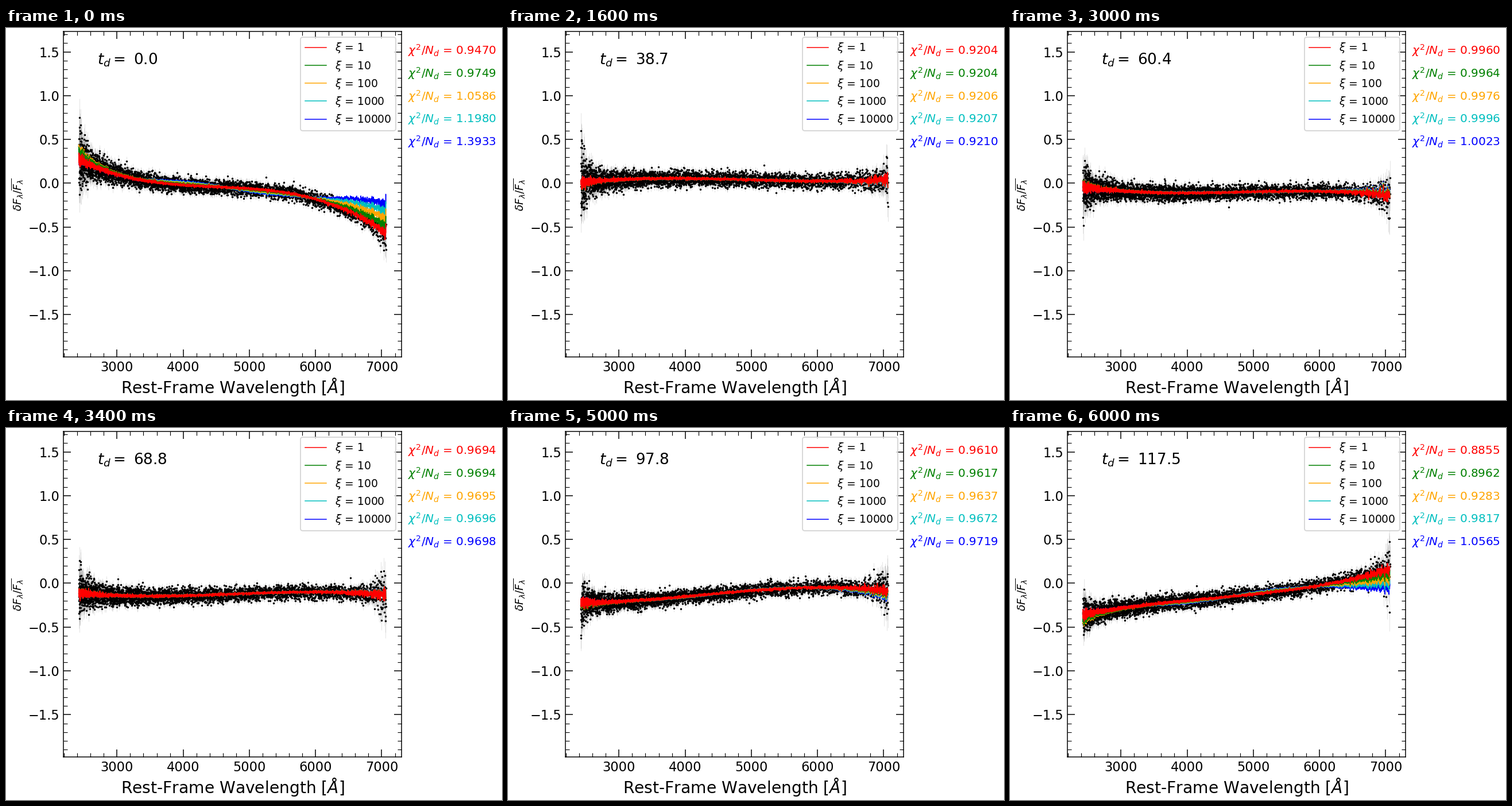
Animation, 864 px wide and 648 px high, one loop 6.2 s. Source, as a matplotlib script:

```python
import numpy as np
import matplotlib.pyplot as plt
from matplotlib.animation import FuncAnimation
from matplotlib.collections import LineCollection
from matplotlib.ticker import AutoMinorLocator, MultipleLocator

W, H, DPI = 864, 648, 135
FRAMES, STEP = 31, 200
LO, HI, N = 2424, 7063, 4000
COLORS = ["r", "g", "orange", "c", "b"]

# Key points over time; everything else follows from these.
KEYS = [0, 4, 8, 15, 20, 25, 30]
DAYS = [0, 17.7, 38.7, 60.4, 81.5, 97.8, 117.5]
LEVEL = [-0.05, -0.014, 0.045, -0.102, -0.155, -0.10, -0.145]
BOW = [-0.10, 0.04, -0.02, 0.012, -0.02, -0.055, 0.045]
TWIST = [-0.33, -0.05, 0.06, -0.09, -0.06, -0.085, 0.09]
CHI2 = [0.9470, 0.9730, 0.9204, 0.9960, 0.9295, 0.9610, 0.8855]

wave = np.geomspace(LO, HI, N)
u = (wave - LO) / (HI - LO)
v = 2 * u - 1
blue_ramp = np.exp(-u / 0.06)
red_ramp = np.clip((u - 0.75) / 0.25, 0, 1) ** 1.3
wiggle = 0.11 * np.where((u > 0.2) & (u < 0.75),
                         np.sin(2 * np.pi * (u - 0.2) / 0.55), 0)


def ends(mid, blue, blue_len, red, red_len):
    """A flat floor that grows exponentially towards both ends."""
    return (mid + blue * np.exp((LO - wave) / blue_len)
            + red * np.exp((wave - HI) / red_len))


model_sigma = ends(0.0075, 0.025, 250, 0.03, 350)


def key(k, track):
    return np.interp(k, KEYS, track)


def slope(k):
    t = k / (FRAMES - 1)
    return -0.09 + 0.26 * t * t * (3 - 2 * t)


def tilt(k):
    return slope(k) + key(k, TWIST)


def flux_sigma(k):
    t = k / (FRAMES - 1)
    blue, red = 1.2 - 0.6 * t, 0.65 + 0.5 * t
    return ends(0.041, 0.11 * blue, 70, 0.12 * red, 60) + ends(
        0, 0.045 * blue, 450, 0.05 * red, 250)


def model(k, i):
    """Mean spectrum of model i; stiffer models follow the tilt less."""
    base = np.polyval([key(k, TWIST), key(k, BOW), slope(k), key(k, LEVEL)], v)
    stiff = i / 4
    lag = 0.8 * stiff * (red_ramp + wiggle)
    lift = 0.22 * np.sin(np.pi * stiff) * blue_ramp
    return base - tilt(k) * (lag + lift)


def chi2(k, i):
    return key(k, CHI2) + 2.53 * tilt(k) ** 2 * (i / 4) ** 2


fig = plt.figure(figsize=(W / DPI, H / DPI), dpi=DPI, facecolor="white")
fig.set_size_inches(6.4, 4.8)
ax = fig.add_axes([100.1 / W, 1 - 573 / H, 588.4 / W, 566.6 / H])
ax.set_xlim(2191, 7295)
ax.set_ylim(-1.982, 1.730)
ax.xaxis.set_major_locator(MultipleLocator(1000))
ax.yaxis.set_major_locator(MultipleLocator(0.5))
for axis in (ax.xaxis, ax.yaxis):
    axis.set_minor_locator(AutoMinorLocator(5))
ax.tick_params(which="both", direction="in", top=True, right=True)
ax.tick_params(which="major", length=7, labelsize=12)
ax.tick_params(which="minor", length=3.5)

fig.text(395 / W, 1 - 636 / H, r"Rest-Frame Wavelength [$\AA$]",
         size=15, ha="center", va="baseline")
fig.text(20 / W, 1 - 289.8 / H, r"$\delta F_\lambda/\overline{F_\lambda}$",
         size=10, rotation=90, ha="center", va="center")

bars = LineCollection([], colors="0.5", linewidths=0.45, alpha=0.25, zorder=1)
ax.add_collection(bars, autolim=False)
dots, = ax.plot([], [], "o", color="k", ms=1.85, mew=0, zorder=2)
lines = [ax.plot([], [], color=c, lw=0.8, zorder=3 - 0.1 * i,
                 label=rf"$\xi$ = {10 ** i}")[0]
         for i, c in enumerate(COLORS)]
ax.legend(handles=lines, loc="upper right", fontsize=10, labelspacing=0.44)

day_text = ax.text(0.1, 0.9, "", size=14, transform=ax.transAxes)
chi_texts = [ax.text(1.02, 0.93 - 0.07 * i, "", size=10.7, color=c,
                     transform=ax.transAxes)
             for i, c in enumerate(COLORS)]


def draw(k):
    rng = np.random.default_rng(100 + k)
    err = flux_sigma(k)
    flux = model(k, 0) + err * rng.standard_normal(N)
    jitter = model_sigma * rng.standard_normal(N)
    low, high = (np.column_stack([wave, flux + s * err]) for s in (-1, 1))
    bars.set_segments(np.stack([low, high], axis=1))
    dots.set_data(wave, flux)
    day_text.set_text(rf"$t_d = $ {key(k, DAYS):.1f}")
    for i, (line, label) in enumerate(zip(lines, chi_texts)):
        line.set_data(wave, model(k, i) + jitter)
        label.set_text(rf"$\chi^2/N_d$ = {chi2(k, i):.4f}")
    return [bars, dots, *lines, day_text, *chi_texts]


anim = FuncAnimation(fig, draw, frames=FRAMES, interval=STEP, repeat=True)
plt.show()
```
